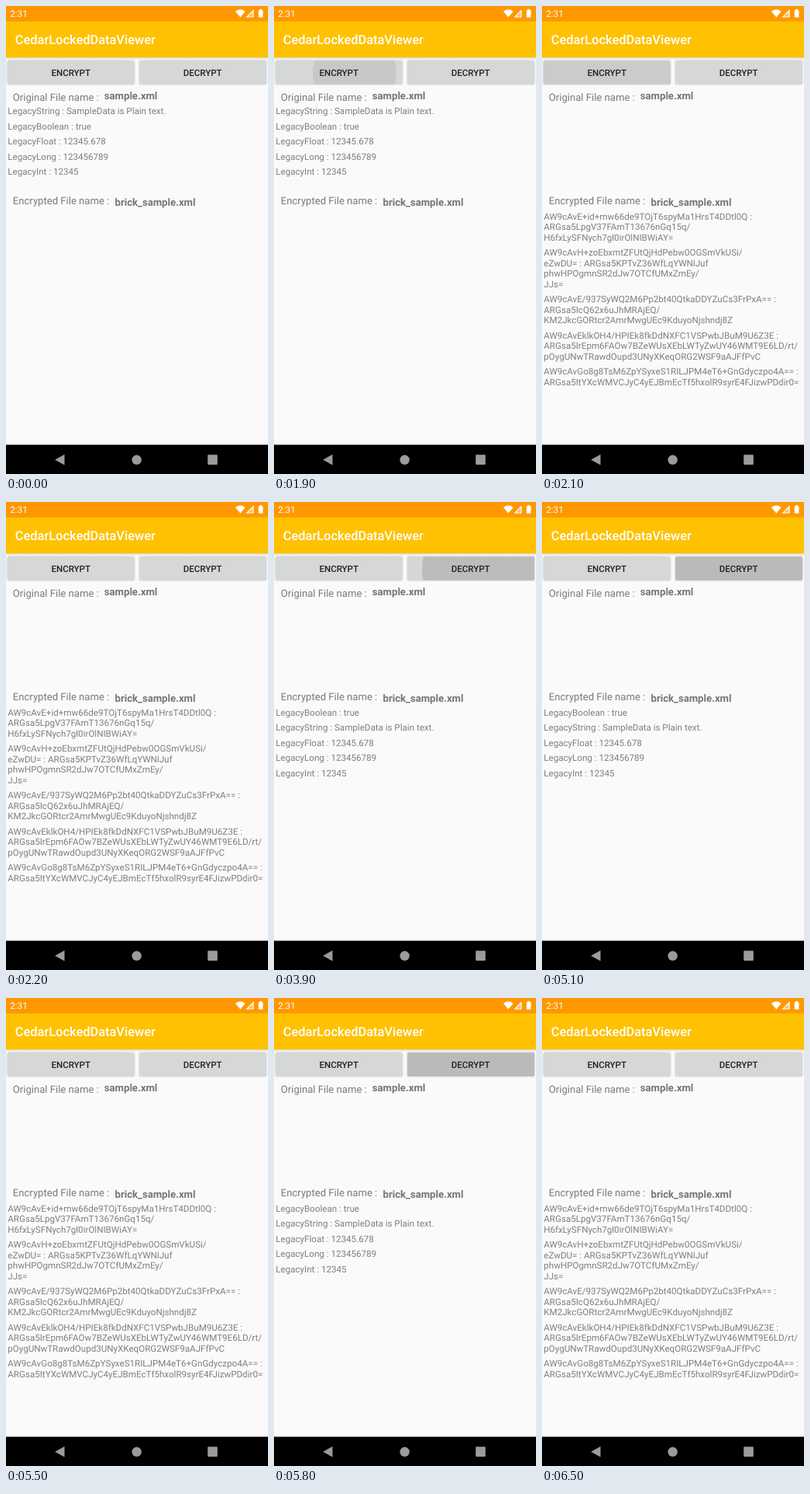
These frames come from a looping animation (338 px wide and 602 px high, 7900 ms). An HTML page:

```html
<!DOCTYPE html>
<html lang="en">
<head>
<meta charset="utf-8">
<title>Encrypted preferences demo</title>
<style>
html, body { margin: 0; width: 100%; height: 100%; overflow: hidden; background: #fafafa; }
svg { display: block; width: 338px; height: 602px; }
text { font-family: Roboto, sans-serif; font-size: 11.6px; fill: #7f7f7f; white-space: pre; text-rendering: geometricPrecision; }
.label { font-size: 13.1px; fill: #7b7b7b; }
.file { font-size: 13.15px; font-weight: 700; fill: #757575; }
.caption { font-size: 11.5px; font-weight: 500; fill: #212121; text-anchor: middle; }
.title { font-size: 16.4px; font-weight: 500; fill: #fff; }
.clock { font-size: 11.7px; fill: #fff; }
.button { fill: #d6d7d7; filter: drop-shadow(0 .8px .9px rgba(0, 0, 0, .22)); }
</style>
</head>
<body>
<svg viewBox="0 0 338 602">
  <defs>
    <linearGradient id="shade" x2="0" y2="1">
      <stop stop-color="#000" stop-opacity=".1"/>
      <stop offset="1" stop-color="#000" stop-opacity="0"/>
    </linearGradient>
    <clipPath id="buttons">
      <rect x="1.7" y="70.3" width="164" height="30.4" rx="1.6"/>
      <rect x="172" y="70.3" width="164" height="30.4" rx="1.6"/>
    </clipPath>
    <clipPath id="half"><rect id="side" y="66" width="169" height="40"/></clipPath>
  </defs>
  <rect width="338" height="602" fill="#fafafa"/>
  <rect y="66" width="338" height="4" fill="url(#shade)"/>
  <rect y="19" width="338" height="47.3" fill="#ffc102"/>
  <rect width="338" height="19.8" fill="#ff9800"/>
  <text class="clock" x="5.2" y="14.1">2:31</text>
  <g fill="#fff">
    <path d="M296 7Q302.300 2.200 308.600 7L302.300 14.600Z"/>
    <path d="M319.500 4.500V14.500H309.500Z" fill-opacity=".35"/>
    <path d="M319.500 4.500V14.500H309.500ZM318.300 7.400L312.300 13.400H318.300Z" fill-rule="evenodd"/>
    <path d="M325.800 5.200H327.300V4H329.900V5.200H331.500V14.800H325.800Z"/>
  </g>
  <text class="title" x="11.800" y="49.300">CedarLockedDataViewer</text>

  <rect class="button" x="1.7" y="70.3" width="164" height="30.4" rx="1.6"/>
  <rect class="button" x="172" y="70.3" width="164" height="30.4" rx="1.6"/>
  <g clip-path="url(#half)"><g clip-path="url(#buttons)"><circle id="ripple" cy="85.5"/></g></g>
  <text class="caption" x="83.700" y="90">ENCRYPT</text>
  <text class="caption" x="253.700" y="90">DECRYPT</text>

  <text class="label" x="8.800" y="121.500">Original File name :</text>
  <text class="file" x="126.800" y="119.600">sample.xml</text>
  <text class="label" x="8.800" y="255">Encrypted File name :</text>
  <text class="file" x="140.500" y="256.600">brick_sample.xml</text>
  <g id="lists"></g>

  <rect y="564.400" width="338" height="38"/>
  <g fill="#9b9b9b">
    <path d="M63.200 583.700L75.500 576.800V590.600Z"/>
    <circle cx="168.600" cy="583.800" r="6.200"/>
    <rect x="260.200" y="577.300" width="12.600" height="12.600" rx=".8"/>
  </g>
</svg>
<script>
const $ = id => document.getElementById(id);
const LOOP = 7900, LINE = 13.5, GAP = 6;

const legacy = [
  "LegacyString : SampleData is Plain text.",
  "LegacyBoolean : true",
  "LegacyFloat : 12345.678",
  "LegacyLong : 123456789",
  "LegacyInt : 12345"
];
const [string, boolean, ...numbers] = legacy;
const cipher = [
  "AW9cAvE+id+mw66de9TOjT6spyMa1HrsT4DDtl0Q :\nARGsa5LpgV37FAmT13676nGq15q/\nH6fxLySFNych7gl0irOlNIBWiAY=",
  "AW9cAvH+zoEbxmtZFUtQjHdPebw0OGSmVkUSi/\neZwDU= : ARGsa5KPTvZ36WfLqYWNlJuf\nphwHPOgmnSR2dJw7OTCfUMxZmEy/\nJJs=",
  "AW9cAvE/937SyWQ2M6Pp2bt40QtkaDDYZuCs3FrPxA== :\nARGsa5IcQ62x6uJhMRAjEQ/\nKM2JkcGORtcr2AmrMwgUEc9KduyoNjshndj8Z",
  "AW9cAvEklkOH4/HPIEk8fkDdNXFC1VSPwbJBuM9U6Z3E :\nARGsa5IrEpm6FAOw7BZeWUsXEbLWTyZwUY46WMT9E6LD/rt/\npOygUNwTRawdOupd3UNyXKeqORG2WSF9aAJFfPvC",
  "AW9cAvGo8g8TsM6ZpYSyxeS1RILJPM4eT6+GnGdyczpo4A== :\nARGsa5ItYXcWMVCJyC4yEJBmEcTf5hxolR9syrE4FJizwPDdir0="
];

function makeList(items, y) {
  let rows = "";
  for (const item of items) {
    for (const row of item.split("\n")) {
      rows += `<text x="2.3" y="${y}">${row}</text>`;
      y += LINE;
    }
    y += GAP;
  }
  $("lists").insertAdjacentHTML("beforeend", `<g>${rows}</g>`);
  return $("lists").lastChild;
}

const plain = makeList(legacy, 139.2);
const encrypted = makeList(cipher, 274.6);
const decrypted = makeList([boolean, string, ...numbers], 274.6);

// Ripples: centre x, radius, colour
const idle = [0, 0, "none"];
const touch = [104, 54, "#c8c8c8"];
const spread = [104, 110, "#bcbcbc"];
const fade = [104, 110, "#cbcbcb"];
const grow = [265, 74, "#bcbcbc"];
const held = [265, 110, "#bababa"];

const steps = [
  [0, plain, idle], [1900, plain, touch],
  [2000, encrypted, spread], [2100, encrypted, fade], [2200, encrypted, idle],
  [3900, decrypted, grow], [4000, decrypted, held],
  [4600, encrypted, spread], [4700, encrypted, fade], [4800, encrypted, idle],
  [5000, decrypted, grow], [5100, decrypted, held],
  [5400, encrypted, fade], [5500, encrypted, idle],
  [5700, decrypted, grow], [5800, decrypted, held],
  [6400, encrypted, fade], [6500, encrypted, idle]
];

function draw(time) {
  const [, list, [x, radius, colour]] = steps.findLast(step => step[0] <= time % LOOP);
  for (const group of $("lists").children)
    group.setAttribute("visibility", group === list ? "visible" : "hidden");
  $("side").setAttribute("x", x < 169 ? 0 : 169);
  $("ripple").setAttribute("cx", x);
  $("ripple").setAttribute("r", radius);
  $("ripple").setAttribute("fill", colour);
}

const start = performance.now();
function tick() {
  draw(performance.now() - start);
  requestAnimationFrame(tick);
}
tick();
</script>
</body>
</html>
```
